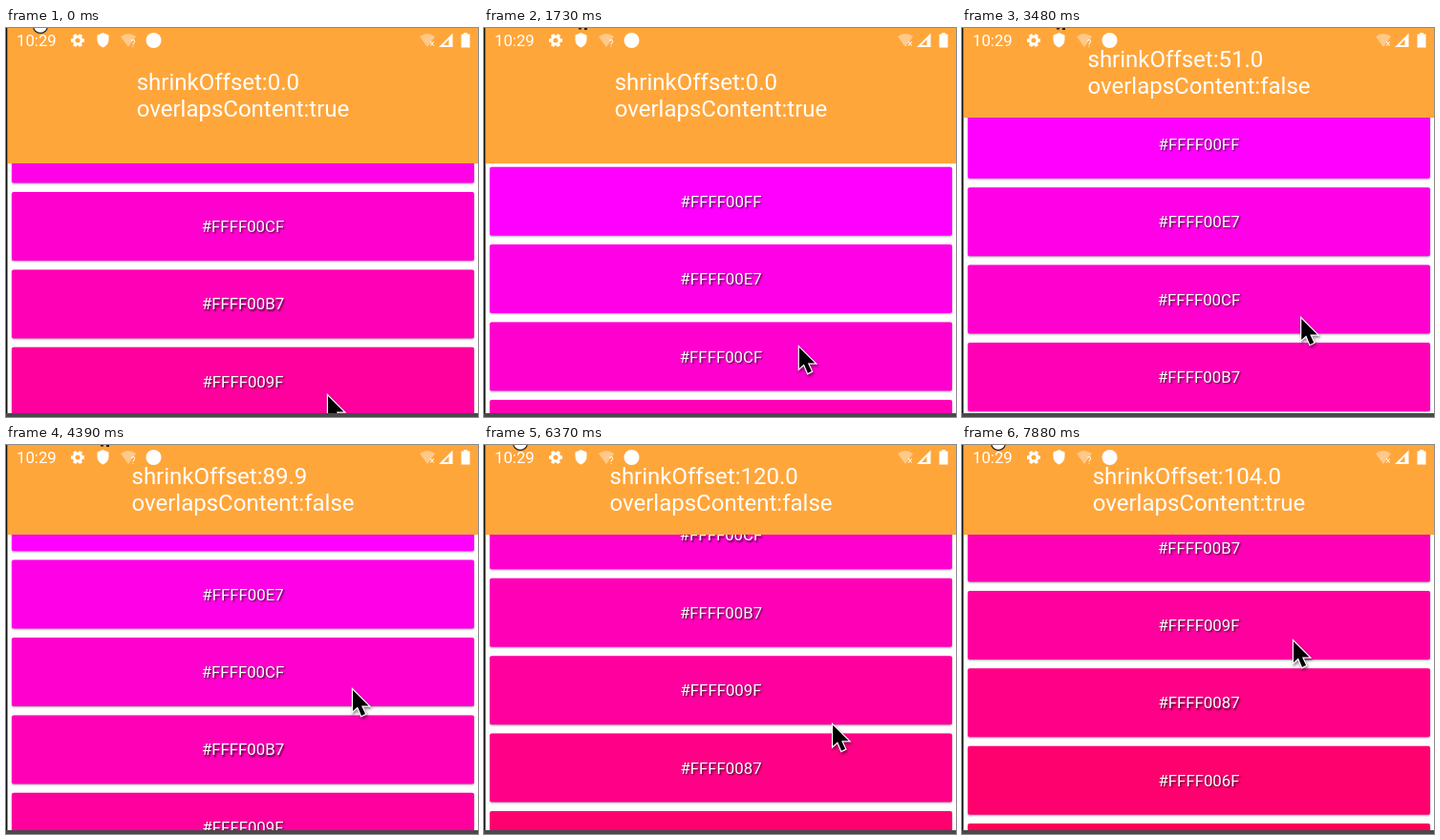
An HTML page with a canvas that plays this animation: 494x408 px, repeating every 7990 ms.

```html
<!DOCTYPE html>
<html>
<head>
<meta charset="utf-8">
<style>
  html, body { margin: 0; width: 494px; height: 408px; overflow: hidden; }
  canvas { display: block; }
</style>
</head>
<body>
<canvas id="stage" width="494" height="408"></canvas>
<script>
const ctx = document.getElementById('stage').getContext('2d');
const LOOP = 7990, SCALE = 1.197, PITCH = 81.4, MAX_SCROLL = 338.7;

// time, pointer x, pointer y, list scroll in pixels
const KEYS = [
  [0, 337, 386, 137.6], [140, 335, 400, 123.6], [500, 318, 212.6, 123.6],
  [1020, 323, 267, 69.2], [1660, 330, 336.2, 0], [2010, 346, 367, 0],
  [2100, 346, 367, 0], [2470, 347, 356, 11.4], [4390, 363, 257, 107.6],
  [5400, 376, 159, 207.3], [5600, 377, 140, 226.3], [6050, 366, 318.8, 226.3],
  [6920, 363, 232, 313.1], [7180, 359, 206.4, MAX_SCROLL],
  [7380, 349, 187, MAX_SCROLL], [7580, 347, 187, MAX_SCROLL],
  [7880, 347, 206, 319.5], [LOOP, 347, 206, 319.5]
];
const SYNC = [0, 1020, 2470, 4390, 5400, 6920, 7880];

// The screen refreshes every 90 ms.
function tick(t) {
  const start = SYNC.filter(s => s <= t).pop();
  return start + Math.floor((t - start) / 90) * 90;
}

function pose(t) {
  const i = KEYS.findIndex(k => k[0] > t);
  const a = KEYS[i - 1], b = KEYS[i], u = (t - a[0]) / (b[0] - a[0]);
  return [1, 2, 3].map(n => a[n] + (b[n] - a[n]) * u);
}

function shrinkAt(t, scroll) {
  if (t < 2100) return 0;
  if (t > 7400) return 120 - (MAX_SCROLL - scroll) / SCALE;
  return Math.min(120, scroll / SCALE);
}

function shadow(color, blur, dx, dy) {
  ctx.shadowColor = color;
  ctx.shadowBlur = blur;
  ctx.shadowOffsetX = dx;
  ctx.shadowOffsetY = dy;
}

function rect(color, x, y, w, h) {
  ctx.fillStyle = color;
  ctx.fillRect(x, y, w, h);
}

function text(str, x, y, size, align = 'left') {
  ctx.font = `${size}px Roboto, sans-serif`;
  ctx.textAlign = align;
  ctx.fillStyle = '#fff';
  ctx.fillText(str, x, y);
}

function fillPath(d, color = '#fff') {
  ctx.fillStyle = color;
  ctx.fill(new Path2D(d), 'evenodd');
}

function disc(x, y, r, color) {
  ctx.fillStyle = color;
  ctx.beginPath();
  ctx.arc(x, y, r, 0, 2 * Math.PI);
  ctx.fill();
}

function card(i, scroll) {
  const y = 146.8 + PITCH * i - scroll;
  if (y > 408 || y < -80) return;
  const blue = (255 - 24 * i).toString(16).toUpperCase().padStart(2, '0');
  ctx.save();
  shadow('rgba(0,0,0,.35)', 2, 0, 1);
  ctx.fillStyle = '#FF00' + blue;
  ctx.beginPath();
  ctx.roundRect(6, y, 484, 72, 2);
  ctx.fill();
  shadow('rgba(0,0,0,.75)', 2, 1.2, 1.2);
  text('#FFFF00' + blue, 248, y + 42, 16.8, 'center');
  ctx.restore();
}

function header(shrink, overlaps) {
  const bottom = 142 - Math.min(shrink, 40) * 1.2;
  const mid = (bottom - 1.6) / 2;
  const line = 'overlapsContent:' + overlaps;
  ctx.save();
  shadow('rgba(0,0,0,.2)', 2, 0, 0);
  rect('#ffa63b', 2, 0, 492, bottom);
  ctx.restore();
  ctx.font = '24px Roboto, sans-serif';
  const left = 248 - ctx.measureText(line).width / 2;
  text('shrinkOffset:' + shrink.toFixed(1), left, mid - 5, 24);
  text(line, left, mid + 23, 24);
}

function gear(x, y) {
  ctx.strokeStyle = '#fff';
  ctx.lineWidth = 3.6;
  ctx.beginPath();
  for (let i = 0; i < 3; i++) {
    const c = 7 * Math.cos(i * Math.PI / 3), s = 7 * Math.sin(i * Math.PI / 3);
    ctx.moveTo(x - c, y - s);
    ctx.lineTo(x + c, y + s);
  }
  ctx.stroke();
  disc(x, y, 5.4, '#fff');
  disc(x, y, 2.5, '#ffa63b');
}

function wifi(x, mark) {
  ctx.globalAlpha = 0.4;
  fillPath(`M${x - 8} 9 Q${x} 3 ${x + 8} 9 L${x} 20Z`);
  ctx.globalAlpha = 1;
  text(mark, x + 5, 20, 10, 'center');
}

function statusBar() {
  text('10:29', 11, 19, 16.8);
  gear(75, 13);
  fillPath('M101.5 5 L107.5 7.5 V12 Q107.5 18 101.5 20.5 Q95.5 18 95.5 12 V7.5Z');
  wifi(128, '?');
  disc(154.5, 13, 8, '#fff');
  wifi(441, '×');
  fillPath('M467.5 5.5 V20 H453Z M463.5 12 L458 18 H463.5Z');
  fillPath('M479 5 H483 V6.5 H485.5 V20.5 H476.5 V6.5 H479Z');
}

function topMark(t) {
  if (t > 500 && t < 4900) {
    rect('#222', 99, 0, 3, 1.5);
    rect('#222', 105, 0, 3, 2);
    return;
  }
  const x = t < 500 ? 36 : 38;
  disc(x, -2, 8, '#222');
  disc(x, -2, 6.8, '#fff');
}

function pointer(x, y) {
  ctx.save();
  ctx.translate(x, y);
  const arrow = new Path2D('M0 0 V22 L5 17.5 L9 27 L13 25 L9 16.5 H16.5Z');
  shadow('rgba(0,0,0,.5)', 3, 1, 2);
  ctx.strokeStyle = '#fff';
  ctx.lineWidth = 2.4;
  ctx.stroke(arrow);
  ctx.restore();
  ctx.save();
  ctx.translate(x, y);
  ctx.fillStyle = '#000';
  ctx.fill(arrow);
  ctx.restore();
}

function draw(now) {
  const t = tick(now % LOOP);
  const [x, y, scroll] = pose(t);
  const shrink = shrinkAt(t, scroll);
  rect('#fff', 0, 0, 494, 408);
  for (let i = 0; i < 9; i++) card(i, scroll);
  header(shrink, shrink < Math.min(120, scroll / SCALE) - 0.01);
  statusBar();
  topMark(t);
  pointer(x, y);
  rect('#111', 0, 0, 1.5, 408);
  rect('#4b484c', 0, 404, 494, 4);
  requestAnimationFrame(draw);
}
requestAnimationFrame(draw);
</script>
</body>
</html>
```
